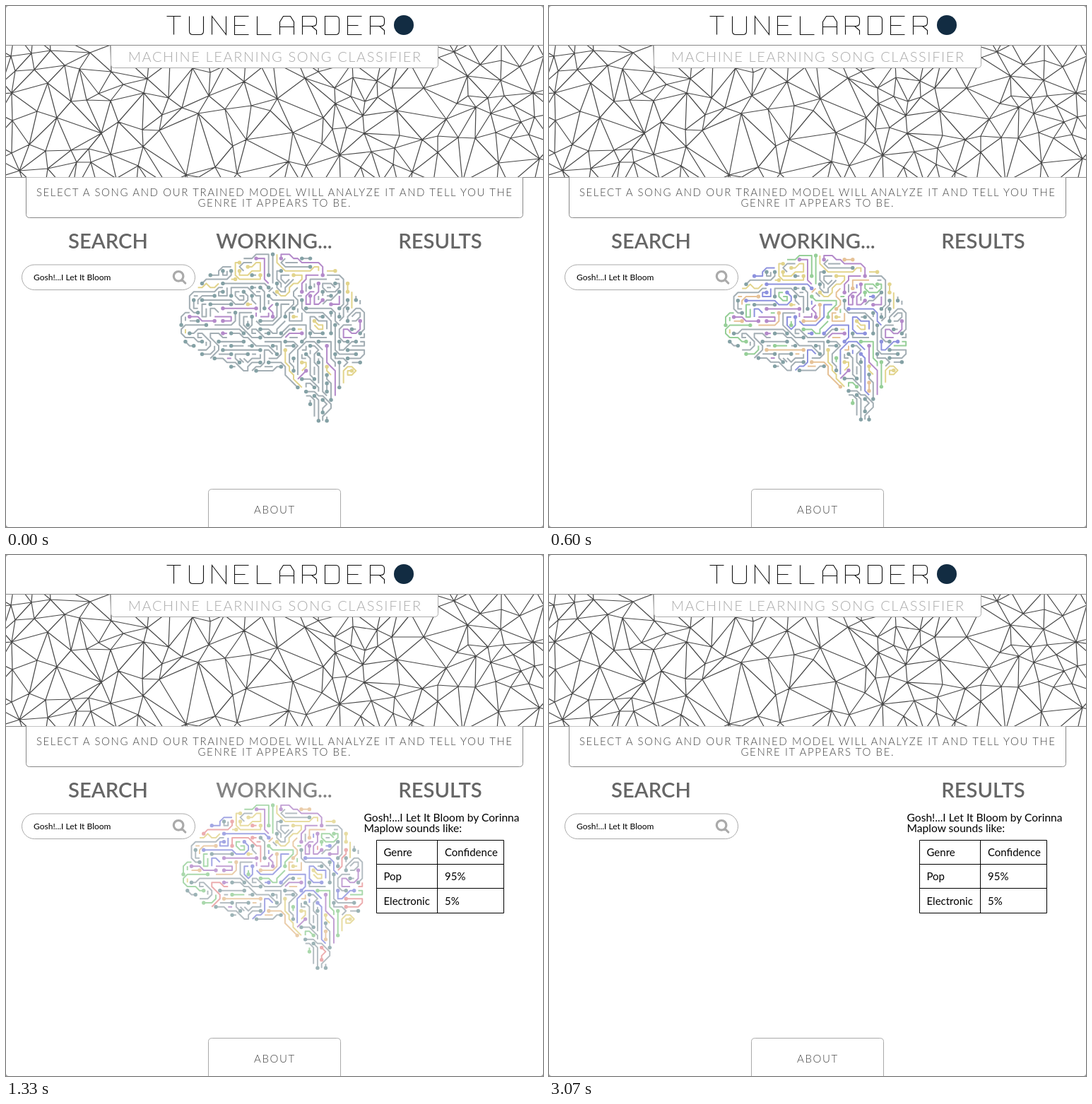
These frames come from a looping animation (760 px wide and 737 px high, 3590 ms). An HTML page:

```html
<!DOCTYPE html>
<html lang="en">
<head>
<meta charset="utf-8">
<title>Song classifier</title>
<style>
  html, body { margin: 0; width: 100%; height: 100%; overflow: hidden; background: #999; }
  svg { display: block; width: 760px; height: 737px; font-family: Lato, sans-serif; }
  .page { fill: #fff; }
  .box { fill: #fff; stroke: #aaa; }
  .rule { stroke: #888; }
  .logo, .mesh { fill: none; stroke: #111; stroke-width: 1.1; }
  .mesh { stroke: #484848; stroke-width: 1.2; }
  .mid { text-anchor: middle; }
  .thin { font-size: 15px; font-weight: 300; letter-spacing: 1.6px; fill: #444; }
  .sub { font-size: 20px; fill: #aaa; }
  .head { font-size: 29.2px; font-weight: 600; fill: #666; }
  .query { font-size: 12px; }
  .song { font-size: 15.6px; }
  .cell { font-size: 15px; }
  .table { fill: none; stroke: #000; }
  .lens { fill: none; stroke: #aaa; stroke-width: 3.2; stroke-linecap: round; }
  .brain path { fill: none; stroke: #a3aeb4; stroke-width: 2; stroke-linejoin: round; }
  .brain circle { fill: #84a1a5; }
  .brain .on path { stroke: var(--tint); }
  .brain .on circle { fill: var(--tint); }
</style>
</head>
<body>
<svg viewBox="0 0 760 737">
  <rect class="page" width="760" height="737" rx="4"/>
  <clipPath id="band"><rect y="56" width="760" height="186"/></clipPath>
  <path class="mesh" id="mesh" clip-path="url(#band)"/>

  <g class="logo" id="logo" role="img" aria-label="TUNELARDER"></g>
  <circle cx="563" cy="27" r="14" fill="#122c42"/>

  <path class="box" d="M148.500 55.500v27q0 5 5 5h453q5 0 5-5v-27"/>
  <path class="rule" d="M0 55.500H760M0 242.500H760"/>
  <text class="thin sub mid" x="380.800" y="79">MACHINE LEARNING SONG CLASSIFIER</text>

  <path class="box" style="stroke:#888" d="M28.500 242.500v52q0 5 5 5h693q5 0 5-5v-52"/>
  <text class="thin mid" x="380.300" y="269">SELECT A SONG AND OUR TRAINED MODEL WILL ANALYZE IT AND TELL YOU THE</text>
  <text class="thin mid" x="380.300" y="284">GENRE IT APPEARS TO BE.</text>

  <text class="head mid" x="144.500" y="342.500">SEARCH</text>
  <text class="head mid" x="614.500" y="342.500">RESULTS</text>

  <rect class="box" x="22.500" y="366" width="245" height="35.500" rx="17.750"/>
  <text class="query" x="39" y="388">Gosh!...I Let It Bloom</text>
  <path class="lens" d="M237.300 382.300a6.800 6.800 0 1 0 13.600 0a6.800 6.800 0 1 0 -13.600 0M249.300 387.500L253.700 392"/>

  <g id="working">
    <text class="head mid" x="379.500" y="342.500">WORKING...</text>
    <g class="brain" id="brain"></g>
  </g>

  <g id="results" visibility="hidden">
    <text class="song" x="506.500" y="377">Gosh!...I Let It Bloom by Corinna</text>
    <text class="song" x="506.500" y="392">Maplow sounds like:</text>
    <path class="table" d="M524.500 403.500h180v103h-180ZM610.500 403.500v103M524.500 437.500h180M524.500 471.500h180"/>
    <g class="cell">
      <text x="534.500" y="426">Genre</text><text x="621" y="426">Confidence</text>
      <text x="534.500" y="460">Pop</text><text x="621" y="460">95%</text>
      <text x="534.500" y="495">Electronic</text><text x="621" y="495">5%</text>
    </g>
  </g>

  <path class="box" d="M286.500 738v-49.500q0-5 5-5h177q5 0 5 5v49.500"/>
  <text class="thin mid" x="380.500" y="717.500">ABOUT</text>
</svg>
<script>
const $ = id => document.getElementById(id);

function add(parent, tag, attrs) {
  const el = document.createElementNS('http://www.w3.org/2000/svg', tag);
  for (const k in attrs) el.setAttribute(k, attrs[k]);
  return parent.appendChild(el);
}

function seeded(seed) {
  return () => {
    seed = seed + 0x6D2B79F5 | 0;
    let z = Math.imul(seed ^ seed >>> 15, 1 | seed);
    z = z + Math.imul(z ^ z >>> 7, 61 | z) ^ z;
    return ((z ^ z >>> 14) >>> 0) / 4294967296;
  };
}

const dist = (a, b) => Math.hypot(a[0] - b[0], a[1] - b[1]);

// Thin stroke lettering on a 20 x 26 cell
function drawLogo() {
  const glyphs = {
    T: 'M0 0H20M10 0V26',
    U: 'M0 0V21Q0 26 5 26H15Q20 26 20 21V0',
    N: 'M0 26V0L20 26V0',
    E: 'M20 0H0V26H20M0 13H15',
    L: 'M0 0V26H20',
    A: 'M0 26V8L5 0H15L20 8V26M0 15H20',
    R: 'M0 26V0H15Q20 0 20 5V9Q20 14 15 14H0M13 14L20 20V26',
    D: 'M0 0H15Q20 0 20 5V21Q20 26 15 26H0Z'
  };
  [...$('logo').getAttribute('aria-label')].forEach((ch, i) =>
    add($('logo'), 'path', { d: glyphs[ch], transform: `translate(${227.5 + i * 32} 14.500)` }));
}

// Centre and radius of the circle through three points
function circumcircle(a, b, c) {
  const bx = b[0] - a[0], by = b[1] - a[1], cx = c[0] - a[0], cy = c[1] - a[1];
  const det = 2 * (bx * cy - by * cx), bb = bx * bx + by * by, cc = cx * cx + cy * cy;
  const ux = (cy * bb - by * cc) / det, uy = (bx * cc - cx * bb) / det;
  return { centre: [a[0] + ux, a[1] + uy], r: Math.hypot(ux, uy) };
}

// Delaunay mesh over loosely scattered points
function drawMesh() {
  const rnd = seeded(23), pts = [], edges = new Set();
  while (pts.length < 195) {
    const p = [rnd() * 840 - 40, rnd() * 250 + 25];
    if (pts.every(q => dist(p, q) > 18)) pts.push(p);
  }
  const line = (a, b) => edges.add(`M${a.map(Math.round)}L${b.map(Math.round)}`);
  pts.forEach((a, i) => {
    for (let j = i + 1; j < pts.length; j++) {
      const b = pts[j];
      if (dist(a, b) > 130) continue;
      for (const c of pts.slice(j + 1)) {
        const { centre, r } = circumcircle(a, b, c);
        if (r < 130 && pts.every(p => dist(p, centre) > r - 1e-6)) {
          line(a, b); line(b, c); line(a, c);
        }
      }
    }
  });
  $('mesh').setAttribute('d', [...edges].join(''));
}

// Each tint takes a share of the traces and lights up during [from, to) of the pulse
const PULSE = 800;
const tints = [
  { tint: '#e89a9c', share: 0.09, from: 130, to: 590 },
  { tint: '#b48aca', share: 0.13, from: 460, to: 930 },
  { tint: '#e2d48c', share: 0.13, from: 460, to: 930 },
  { tint: '#96cf98', share: 0.11, from: 330, to: 730 },
  { tint: '#8d92de', share: 0.10, from: 330, to: 730 },
  { tint: '#e6c297', share: 0.11, from: 330, to: 730 }
];

// Circuit traces: walks in eight directions that fill the outline without crossing
function drawBrain() {
  const rnd = seeded(8), step = 5.8, brain = $('brain'), stemTop = 535;
  const shape = new Path2D('M248 455C250 390 320 350 385 350C455 352 511 400 511 465C511 500 490 525 468 542' +
    'L452 590H440L420 545Q405 540 388 512Q350 528 310 506C270 490 248 480 248 455Z');
  const ctx = document.createElement('canvas').getContext('2d');
  const at = ([c, r]) => [250 + c * step, 353 + r * step];
  const key = (c, r) => c + ',' + r;
  const free = new Set(), cells = [], dots = [];
  for (let c = 0; c < 46; c++) for (let r = 0; r < 42; r++) {
    const [x, y] = at([c, r]);
    if (!ctx.isPointInPath(shape, x, y)) continue;
    free.add(key(c, r));
    cells.push({ c, r, order: y > stemTop ? -r : rnd() });
  }
  cells.sort((a, b) => a.order - b.order);

  const plain = add(brain, 'g', {});
  for (const t of tints) t.group = add(brain, 'g', { style: `--tint:${t.tint}` });
  const pickGroup = () => {
    let u = rnd();
    const t = tints.find(t => (u -= t.share) < 0);
    return t ? t.group : plain;
  };

  const dirs = [[1, 0], [1, 1], [0, 1], [-1, 1], [-1, 0], [-1, -1], [0, -1], [1, -1]];
  const startDir = (x, y) => {
    if (y > stemTop) return 6;
    const upright = Math.sin(x / 27) + Math.cos(y / 22) + (430 - y) / 90 + rnd() - 0.5 > 0;
    return (upright ? 2 : 0) + (rnd() < 0.5 ? 4 : 0);
  };

  function walk(c, r) {
    let dir = startDir(...at([c, r]));
    const trace = [[c, r]], max = 5 + rnd() * 9;
    while (trace.length < max) {
      const side = rnd() < 0.5 ? 1 : 7;
      const ahead = rnd() < (dir % 2 ? 0.35 : 0.8);
      const turns = ahead ? [0, side, 8 - side, 2, 6] : [side, 8 - side, 0, 2, 6];
      const next = turns.map(k => (dir + k) % 8).find(d => {
        const [dx, dy] = dirs[d];
        return free.has(key(c + dx, r + dy)) &&
          (d % 2 === 0 || free.has(key(c + dx, r)) || free.has(key(c, r + dy)));
      });
      if (next === undefined) break;
      dir = next;
      c += dirs[dir][0];
      r += dirs[dir][1];
      free.delete(key(c, r));
      trace.push([c, r]);
    }
    return trace.map(at);
  }

  for (const { c, r } of cells) {
    if (!free.delete(key(c, r))) continue;
    const pts = walk(c, r);
    if (pts.length < 2) continue;
    const group = pickGroup();
    add(group, 'path', { d: 'M' + pts.map(p => p.map(v => v.toFixed(1))).join('L') });
    for (const p of [pts[0], pts[pts.length - 1]]) {
      if (dots.some(q => dist(p, q) < 8.5)) continue;
      dots.push(p);
      add(group, 'circle', { cx: p[0], cy: p[1], r: 2.7 });
    }
  }
}

const LOOP = 3590, FPS = 15, SHOW = 1130, FADE = 700;

function render(ms) {
  const t = Math.floor((ms % LOOP + 4) * FPS / 1000) * 1000 / FPS;
  const phase = t % PULSE;
  const scale = 1 + 0.015 * Math.cos(phase / PULSE * 2 * Math.PI);
  $('brain').setAttribute('transform', `translate(379 470.500) scale(${scale}) translate(-379 -470.500)`);
  for (const { group, from, to } of tints) {
    const on = phase >= from && phase < to || phase + PULSE < to;
    group.setAttribute('class', on ? 'on' : '');
  }
  const p = Math.min(1, Math.max(0, (t - SHOW) / FADE));
  $('working').setAttribute('opacity', (1 + Math.cos(p * Math.PI)) / 2);
  $('results').setAttribute('visibility', t >= SHOW ? 'visible' : 'hidden');
}

drawLogo();
drawMesh();
drawBrain();
render(0);

let start;
requestAnimationFrame(function tick(now) {
  start ??= now;
  render(now - start);
  requestAnimationFrame(tick);
});
</script>
</body>
</html>
```
